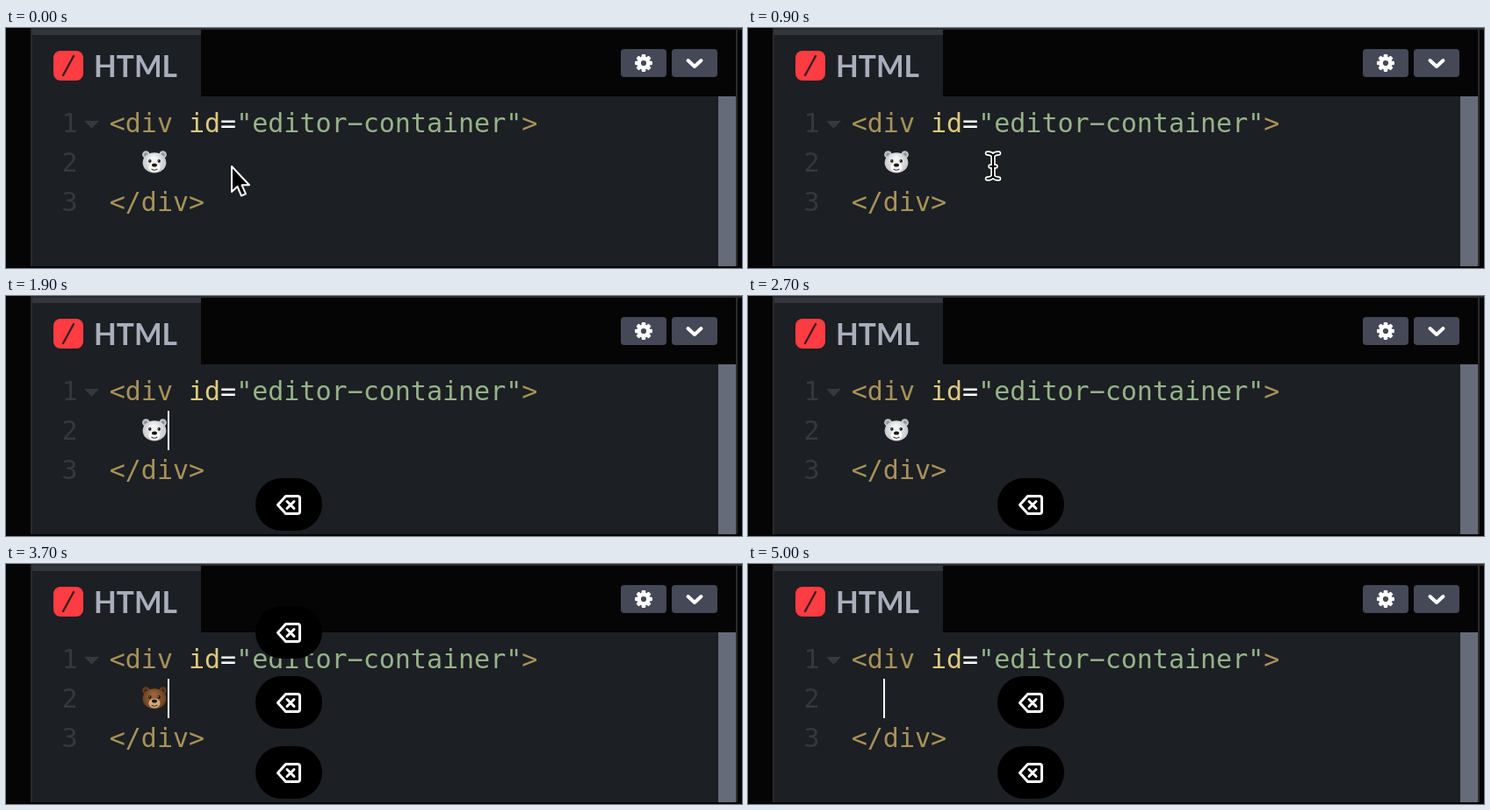
Recreate the animation shown at these times as an HTML page with a canvas. Size 838 by 274 pixels, loop 5100 ms.

```html
<!DOCTYPE html>
<html lang="en">
<head>
<meta charset="utf-8">
<title>Deleting an emoji step by step</title>
<style>
html, body { margin: 0; width: 100%; height: 100%; overflow: hidden; background: #050505; }
canvas { display: block; width: 838px; height: 274px; }
</style>
</head>
<body>
<canvas id="stage" width="838" height="274"></canvas>
<script>
const ctx = document.getElementById('stage').getContext('2d');
const LOOP = 5100, STEP = 100;
const MONO = '30px "DejaVu Sans Mono", monospace';
const CODE_X = 117.7, BASE = 119, LINE = 45, CHAR = 18.06;
const TAG = '#a7925a', ATTR = '#ddca7e', STRING = '#96b38a', GUTTER = '#35383d';

function rect(x, y, w, h, color, r = 0) {
  ctx.fillStyle = color;
  ctx.beginPath();
  ctx.roundRect(x, y, w, h, r);
  ctx.fill();
}

function oval(x, y, rx, ry, color, angle = 0) {
  ctx.fillStyle = color;
  ctx.beginPath();
  ctx.ellipse(x, y, rx, ry, angle, 0, Math.PI * 2);
  ctx.fill();
}

function stroke(d, color, width) {
  ctx.strokeStyle = color;
  ctx.lineWidth = width;
  ctx.stroke(new Path2D(d));
}

function text(str, x, y, color, font) {
  ctx.font = font;
  ctx.fillStyle = color;
  ctx.fillText(str, x, y);
}

function code(row, parts) {
  let col = 0;
  for (const [str, color] of parts) {
    text(str, CODE_X + col * CHAR, BASE + row * LINE, color, MONO);
    col += str.length;
  }
}

function gear(x, y) {
  ctx.save();
  ctx.translate(x, y);
  for (let i = 0; i < 8; i++) {
    rect(-2.3, -10, 4.6, 6, '#fff', 1.2);
    ctx.rotate(Math.PI / 4);
  }
  oval(0, 0, 7.6, 7.6, '#fff');
  oval(0, 0, 3.1, 3.1, '#444857');
  ctx.restore();
}

function drawEditor() {
  rect(0, 0, 838, 274, '#050505');
  rect(28, 0, 810, 2, '#2b2b2c');
  rect(28, 0, 2, 274, '#2b2b2c');
  rect(30, 78, 781, 194, '#1c1f23');
  rect(30, 2, 192, 76, '#1c1f23');
  rect(30, 2, 192, 6, '#34363e');
  rect(811, 78, 20, 194, '#666b7a');
  rect(831, 0, 2, 274, '#2b2b2c');

  rect(54, 26, 34, 34, '#ff3c41', 8);
  stroke('M65 54L77 32', '#3a2024', 2.4);
  text('HTML', 100, 56, '#aaaebc', '700 33.5px Lato, sans-serif');

  rect(700, 24, 52, 32, '#444857', 4);
  rect(758, 24, 52, 32, '#444857', 4);
  gear(726, 40);
  stroke('M776.5 37L784 44L791.5 37', '#fff', 4);

  for (let i = 0; i < 3; i++) text(String(i + 1), 63.5, BASE + i * LINE, GUTTER, MONO);
  ctx.fillStyle = GUTTER;
  ctx.fill(new Path2D('M89 106H106L97.5 115Z'));

  code(0, [['<div', TAG], [' id', ATTR], ['=', '#fff'],
    ['"editor\u2212container"', STRING], ['>', TAG]]);
  code(2, [['</div>', TAG]]);
}

function drawBear(polar) {
  const fur = ctx.createRadialGradient(168, 149, 2, 169, 154, 15);
  fur.addColorStop(0, polar ? '#f4f5f6' : '#9a6536');
  fur.addColorStop(1, polar ? '#bfc2c6' : '#643a1c');
  const inner = polar ? '#8d9095' : '#4b2a14';
  const muzzle = polar ? '#fafafa' : '#d3aa7d';
  for (const s of [-1, 1]) {
    oval(169 + s * 9.6, 144.5, 4.3, 4.3, fur);
    oval(169 + s * 9.6, 144.8, 2.2, 2.2, inner);
  }
  oval(169, 153.8, 13.4, 11.6, fur);
  oval(169, 159, 6.6, 5.6, muzzle);
  for (const s of [-1, 1]) {
    oval(169 + s * 5.2, 151.8, 1.7, 1.9, '#17130f');
    oval(169 + s * 5.2 - 0.5, 151.2, 0.5, 0.5, '#ddd');
  }
  oval(169, 156.6, 3, 2, '#1d1815');
  stroke('M166 161.2Q169 163.2 172 161.2', '#3b302a', 1.1);
}

// Backspace key bubble, y is its top edge
function drawKey(y, alpha = 1) {
  ctx.save();
  ctx.globalAlpha = alpha;
  ctx.translate(284, y);
  rect(0, 0, 76, 60, '#000', 30);
  stroke('M34.5 20.5H48Q50.5 20.5 50.5 23V38Q50.5 40.5 48 40.5H34.5L25.5 30.5Z', '#fff', 3);
  stroke('M36 26.5L44 34.5M44 26.5L36 34.5', '#fff', 3);
  ctx.restore();
}

function drawArrow(x, y) {
  ctx.save();
  ctx.translate(x, y);
  const shape = 'M0 1V30L6.5 24L11 34.5L16 32.3L11.5 22.3H20Z';
  ctx.fillStyle = '#000';
  ctx.fill(new Path2D(shape));
  stroke(shape, '#fff', 2);
  ctx.restore();
}

function drawBeam(x, y) {
  ctx.save();
  ctx.translate(x, y);
  const shape = 'M-6.5 -14Q-1 -14 0 -10.5Q1 -14 6.5 -14M0 -10.5V11.5' +
    'M-6.5 15Q-1 15 0 11.5Q1 15 6.5 15M-3 1H3';
  stroke(shape, '#fff', 5.5);
  stroke(shape, '#000', 2.2);
  ctx.restore();
}

const clamp = v => Math.min(1, Math.max(0, v));
const ease = v => (v = clamp(v)) * v * (3 - 2 * v);
const within = (t, a, b) => t >= a && t < b;

function drawPointer(t) {
  if (t >= 1900) return;
  const x = 257 + 22 * ease(t / 800) - 60 * ease((t - 900) / 900);
  if (t < 200) drawArrow(x, 157);
  else drawBeam(x, 157);
}

const caretOn = [[1700, 2400], [2800, 3400], [3700, 4300], [4600, LOOP]];
const flashes = [[3700, 3850, 4000], [4600, 4750, 4980]];

function draw(t) {
  drawEditor();
  if (t < 4600) drawBear(t < 2800);
  if (caretOn.some(([a, b]) => within(t, a, b))) {
    rect(t < 4600 ? 184 : 154, 131, 2, 45, '#fff');
  }
  if (t >= 1900) drawKey(208);
  if (t >= 2800) drawKey(128);
  for (const [start, fade, end] of flashes) {
    if (within(t, start, end)) drawKey(48, 1 - clamp((t - fade) / (end - fade)));
  }
  drawPointer(t);
  rect(0, 272, 838, 2, '#050505');
}

ctx.lineCap = ctx.lineJoin = 'round';
const begin = performance.now();
function tick() {
  const t = (performance.now() - begin) % LOOP;
  draw(Math.floor(t / STEP) * STEP);
  requestAnimationFrame(tick);
}
tick();
</script>
</body>
</html>
```
